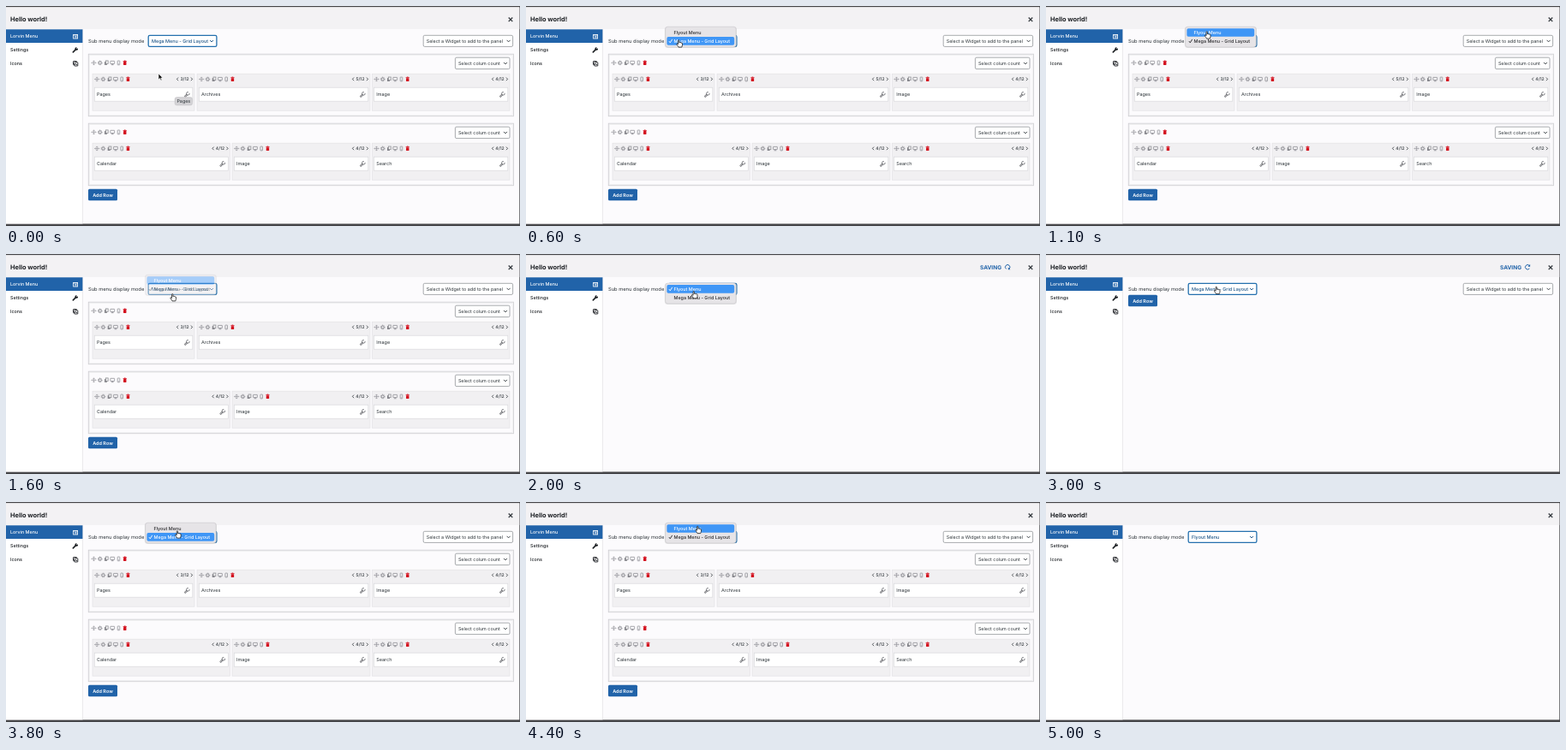
Write an HTML page that moves like this. It is 600 by 257 pixels and loops after 5.5 s.

```html
<!DOCTYPE html>
<html lang="en">
<head>
<meta charset="utf-8">
<title>Menu editor</title>
<style>
html, body { margin: 0; width: 100%; height: 100%; overflow: hidden; background: #fcfbfd; }
svg { display: block; width: 100vw; height: 100vh; }
text { font-family: Inter, "Open Sans", sans-serif; text-rendering: geometricPrecision; white-space: pre; }
</style>
</head>
<body>
<svg id="stage" viewBox="0 0 600 257" xmlns="http://www.w3.org/2000/svg"></svg>
<script>
const LOOP = 5500, STEP = 100;
const BLUE = '#2163a9', INK = '#2c3338', GREY = '#85858b';
const stage = document.getElementById('stage');

const rect = (x, y, x2, y2, fill, stroke = 'none', r = 0, w = 1) =>
  `<rect x="${x}" y="${y}" width="${x2 - x}" height="${y2 - y}" rx="${r}" fill="${fill}" stroke="${stroke}" stroke-width="${w}"/>`;
// y is the middle of the capitals
const text = (x, y, s, size = 5.45, fill = INK, weight = 400, anchor = 'start') =>
  `<text x="${x}" y="${y + size * 0.364}" font-size="${size}" fill="${fill}" font-weight="${weight}" text-anchor="${anchor}">${s}</text>`;
const line = (d, color, w = 0.8, more = '') =>
  `<path d="${d}" fill="none" stroke="${color}" stroke-width="${w}" ${more}/>`;
const at = (x, y, body) => `<g transform="translate(${x} ${y})">${body}</g>`;
const group = (id, body) => `<g id="${id}">${body}</g>`;

const chevron = (x, y, color = INK) => at(x, y, line('M-2-1L0 1L2-1', color, 0.9));

function wrench(x, y, color, hollow) {
  const head = 'M3.1-1.9A1.8 1.8 0 1 1 1.9-3.1L1.3-1.5Z', shaft = 'M-2.5 2.5L.5-.5';
  const body = hollow
    ? line(shaft, color, 2) + line(shaft, '#fff', 0.7) + line('M3.1-1.9A1.8 1.8 0 1 1 1.9-3.1', color, 0.8)
    : line(shaft, color, 1.6, 'stroke-linecap="round"') + `<path d="${head}" fill="${color}"/>`;
  return at(x, y, body);
}

const tools = [
  line('M-2.5 0H2.5M0-2.5V2.5M-1-1.6L0-2.6L1-1.6M-1 1.6L0 2.6L1 1.6M-1.6-1L-2.6 0L-1.6 1M1.6-1L2.6 0L1.6 1', GREY, 0.55),
  `<circle r="1.6" fill="none" stroke="${GREY}" stroke-width="1"/><circle r="2.4" fill="none" stroke="${GREY}" stroke-width=".7" stroke-dasharray=".94 .94"/>`,
  rect(-2, -1.3, 1, 2.5, GREY) + rect(-0.7, -2.5, 2.2, 1.2, '#eee', GREY, 0, 0.7),
  rect(-2.4, -2.1, 2.4, 1.1, 'none', GREY, 0.3, 0.7) + line('M0 1V2.3M-1.4 2.3H1.4', GREY, 0.7),
  rect(-1.3, -2.4, 1.3, 2.4, 'none', GREY, 0.4, 0.7) + line('M-.5 1.5H.5', GREY, 0.6),
  rect(-1.7, -1.3, 1.7, 2.6, '#d30f1d', 'none', 0.4) + line('M-2.1-1.9H2.1M-.8-2.5H.8', '#d30f1d', 0.8)
];
const toolbar = (x, y) => tools.map((icon, i) => at(x + i * 7.25, y, icon)).join('');

function select(x, y, x2, y2, label) {
  return rect(x, y, x2, y2, '#fff', '#85888d', 1.5, 0.7) +
    text(x + 3.5, (y + y2) / 2, label, 5.4) + chevron(x2 - 5, (y + y2) / 2);
}

function column(x, x2, y, name, span) {
  const mid = x2 - 11.5;
  return rect(x, y, x2, y + 43, '#f1f0f2', '#e3e2e5', 0, 0.7) +
    toolbar(x + 5.2, y + 6.3) +
    text(mid, y + 6.2, span + '/12', 5, INK, 500, 'middle') +
    line(`M${mid - 7.4} ${y + 4.4}l-1.7 1.8l1.7 1.8M${mid + 7.4} ${y + 4.4}l1.7 1.8l-1.7 1.8`, INK, 0.8) +
    rect(x + 2.3, y + 16, x2 - 2.2, y + 32, '#fff', '#d9d9dc', 0, 0.7) +
    text(x + 5, y + 24.2, name) + wrench(x2 - 9, y + 24.5, '#66676c', true);
}

function row(y, cols) {
  return rect(96.3, y, 592.4, y + 72.5, '#fcfbfd', '#cfcfd3', 0, 0.9) +
    rect(97.5, y + 1.2, 591.2, y + 71.3, 'none', '#efeff1', 0, 0.8) +
    toolbar(102.5, y + 10.2) +
    select(524.4, y + 4, 588, y + 17.4, 'Select colum count') +
    cols.map(c => column(c[0], c[1], y + 23, c[2], c[3])).join('');
}

const addRow = y => rect(96, y, 130, y + 13.4, BLUE, 'none', 1.5) +
  text(113, y + 6.7, 'Add Row', 5.5, '#fff', 600, 'middle');

const check = (x, y) => line(`M${x - 1.8} ${y + 0.2}l1.4 1.8l2.4-4`, 'currentColor', 0.9);

stage.innerHTML =
  rect(0, 0, 600, 257, '#454548') +
  rect(0, 1.4, 599.3, 254.4, '#fcfbfd') +
  rect(0, 1.4, 599.3, 27, '#f3f2f4') +
  rect(0, 27, 89, 254.4, '#fff') + rect(89, 27, 89.7, 254.4, '#e4e3e6') +
  rect(0, 27.3, 89.4, 43, BLUE) +
  text(5, 15.2, 'Hello world!', 7.4, '#1d2024', 700) +
  line('M586.7 13.5l4.6 4.6m0-4.6l-4.6 4.6', '#32373c', 1.3) +
  text(5, 35.4, 'Lorvin Menu', 5.4, '#fff', 500) +
  text(5, 51, 'Settings', 5.4, '#1d2024', 500) +
  text(5, 66.9, 'Icons', 5.4, '#1d2024', 500) +
  rect(78.6, 33.4, 83.6, 38, 'none', '#fff', 0, 0.8) + line('M78.6 34H83.6M80 35.6H82.6M80 36.9H82.6', '#fff', 0.7) +
  wrench(80.8, 51.4, '#1d2024') +
  rect(78.5, 64.5, 82.5, 68.7, '#fff', '#1d2024', 0.4, 0.9) +
  rect(79.8, 65.8, 83.8, 70, '#fff', '#1d2024', 0.4, 0.9) + line('M80.3 69L81.5 67.5L83.3 69.4', '#1d2024', 0.9) +
  text(96, 41, 'Sub menu display mode', 5.75) +
  rect(166.2, 34.3, 245.9, 47.3, '#fff', '#2470ae', 1.6, 1.3) +
  group('mode', text(170, 40.9, '', 5.45, '#1f5688', 500)) + chevron(240, 41, '#1f5688') +
  group('widgets', select(487.2, 34.3, 591.6, 47.4, 'Select a Widget to add to the panel')) +
  group('lone', addRow(47.8)) +
  group('grid',
    row(56.2, [[101, 220, 'Pages', 3], [223, 425, 'Archives', 5], [427.3, 588, 'Image', 4]]) +
    row(137.2, [[101, 261.5, 'Calendar', 4], [264, 425, 'Image', 4], [427.3, 588, 'Search', 4]]) +
    addRow(213.8)) +
  group('tip', rect(197, 106.5, 217.6, 116, '#d3d2d5', '#c2c1c4', 2.5, 0.5) + text(207.3, 111.2, 'Pages', 5.4, INK, 400, 'middle')) +
  group('saving', text(530, 15.2, 'SAVING', 6.5, BLUE, 700) +
    at(562.2, 15.3, group('spin', line('M2.1 1.7A2.7 2.7 0 1 1 1.9-1.9', BLUE, 1) + `<path d="M2.9-3.2V-.6H.3Z" fill="${BLUE}"/>`))) +
  group('popup',
    rect(161.9, 24.2, 246, 49, '#000', 'none', 3.4).replace('/>', ' opacity=".1"/>') +
    rect(162.6, 24.2, 245.2, 48, '#e6e4e7', '#c4c3c6', 3, 0.5) +
    rect(164.4, 0, 243.2, 9.6, '#3f96f6', 'none', 1.8).replace('<rect', '<rect id="glow"') +
    group('first', check(168.7, 31) + text(172.5, 31, 'Flyout Menu', 5.4, 'currentColor', 500)) +
    group('second', check(168.7, 40.9) + text(172.5, 40.9, 'Mega Menu - Grid Layout', 5.4, 'currentColor', 500))) +
  group('arrow', '<path d="M0 0V6.9L1.6 5.4L2.8 8L4 7.5L2.8 5H5Z" fill="#111" stroke="#fff" stroke-width=".6"/>') +
  group('hand', '<path d="M-1.9 0C-1.9-1-.6-1-.6 0V2.3C-.4 1.7.6 1.8.6 2.5C.9 2 1.8 2.1 1.8 2.8C2.2 2.4 3 2.6 3 3.3V5.3C3 6.4 2.3 6.7 2.3 7.6H-1.5C-1.5 6.6-3.6 5-3.6 3.9C-3.5 3.2-2.5 3.3-1.9 4.2Z" fill="#fff" stroke="#111" stroke-width=".75"/>');

const el = {};
stage.querySelectorAll('[id]').forEach(n => el[n.id] = n);
const label = el.mode.firstChild;

// time, x, y of the pointer's tip
const path = [
  [0, 178, 79], [100, 178, 77], [400, 178.5, 43], [600, 179.5, 40.5], [800, 180, 40],
  [1100, 189, 30.5], [1400, 193, 31], [1600, 195.5, 47.3], [2000, 197, 44.2], [2400, 199, 47.5],
  [2600, 199, 47.5], [3000, 200, 39], [3600, 200, 39], [3800, 201.2, 34.5], [4100, 201.5, 29], [5000, 201.5, 29]
];
// open from, fade from, shut; pointer reaches the other item; current item
const menus = [
  [500, 1600, 1700, 1000, 1],
  [1900, 2700, 2800, 2200, 0],
  [3600, 4500, 4600, 4000, 1]
];

const within = (t, ...spans) => spans.some(([a, b]) => t >= a && t < b);
const show = (node, on) => node.style.display = on ? '' : 'none';

function pointer(t) {
  const i = Math.max(1, path.findIndex(p => p[0] > t));
  const [a, x, y] = path[i - 1], [b, x2, y2] = path[i];
  const k = (t - a) / (b - a), e = k * k * (3 - 2 * k);
  return [x + (x2 - x) * e, y + (y2 - y) * e];
}

function popup(t) {
  const m = menus.find(m => t >= m[0] && t < m[2]);
  show(el.popup, m);
  if (!m) return;
  const current = m[4], hot = t < m[3] ? current : 1 - current;
  el.popup.setAttribute('transform', `translate(0 ${current ? 0 : 9.9})`);
  el.popup.setAttribute('opacity', t < m[1] ? 1 : 0.45);
  el.glow.setAttribute('y', 26.2 + hot * 9.9);
  [el.first, el.second].forEach((item, i) => {
    item.style.color = i === hot ? '#fff' : '#29292c';
    show(item.firstChild, i === current);
  });
}

function draw(t) {
  const flyout = within(t, [1700, 2800], [4600, LOOP]);
  const grid = within(t, [0, 1700], [3300, 4600]);
  label.textContent = flyout ? 'Flyout Menu' : 'Mega Menu - Grid Layout';
  show(el.grid, grid);
  show(el.widgets, !flyout);
  show(el.lone, !flyout && !grid);
  show(el.tip, t < 200);
  show(el.saving, within(t, [1700, 2300], [2800, 3300], [4600, 4900]));
  el.spin.setAttribute('transform', `rotate(${(t - 3000) * 0.27})`);
  popup(t);
  show(el.arrow, t < 400);
  show(el.hand, within(t, [400, 4900]));
  if (t < 4900) {
    const [x, y] = pointer(t), place = `translate(${x} ${y})`;
    el.arrow.setAttribute('transform', place);
    el.hand.setAttribute('transform', place);
  }
}

const start = performance.now();
function tick() {
  const t = (performance.now() - start) % LOOP;
  draw(Math.min(5000, Math.floor(t / STEP) * STEP));
  requestAnimationFrame(tick);
}
tick();
</script>
</body>
</html>
```
